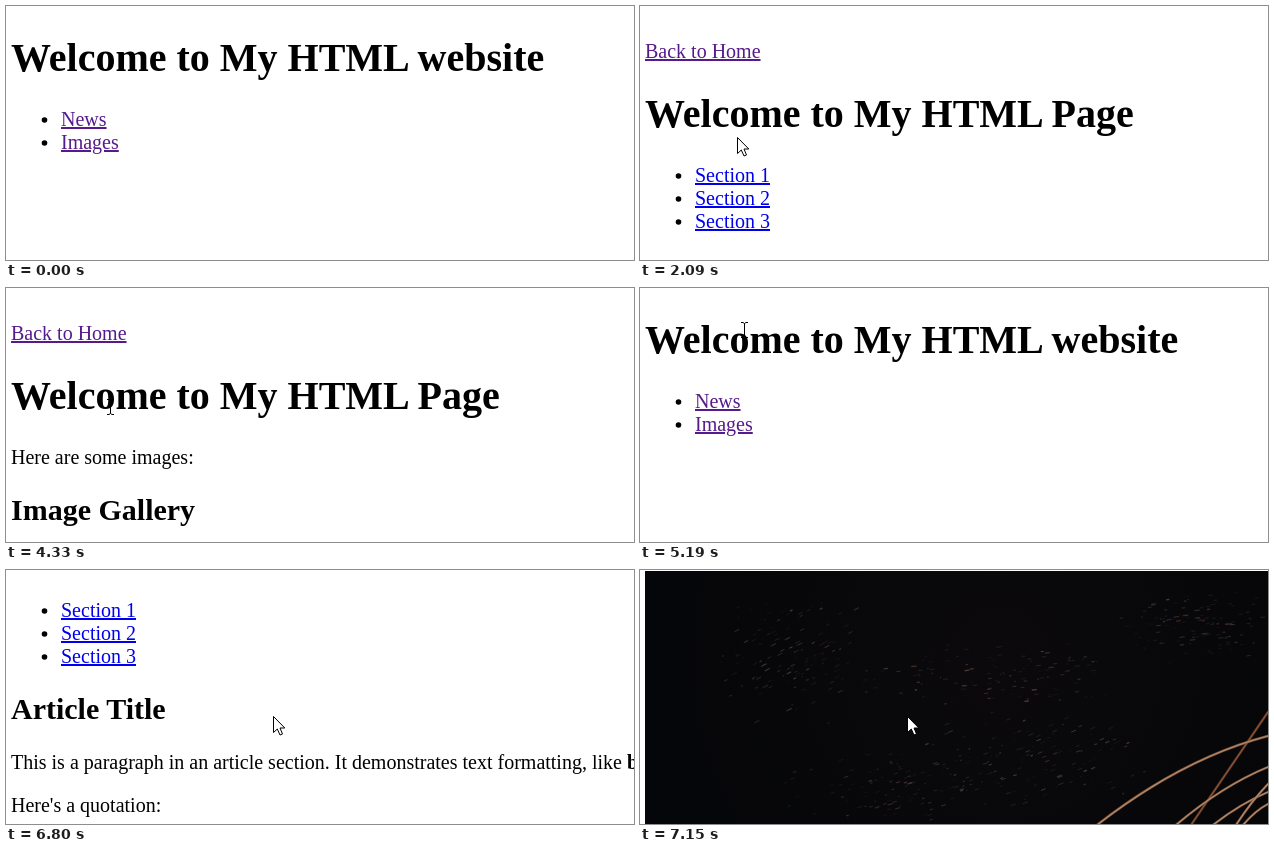
An HTML page for the animation above (8 s loop, 628 by 254 pixels).

```html
<!DOCTYPE html>
<html lang="en">
<head>
<meta charset="utf-8">
<title>My HTML website</title>
<style>
  html, body { margin: 0; width: 100%; height: 100%; overflow: hidden; background: #fff; }
  svg { display: block; }
  text { font: 20px "Liberation Serif", "Times New Roman", serif; }
  .h1 { font-size: 40px; font-weight: bold; }
  .h2 { font-size: 30px; font-weight: bold; }
  .link { fill: #00e; text-decoration: underline; }
  .seen { fill: #551a8b; }
</style>
</head>
<body>
<svg width="628" height="254" viewBox="0 0 628 254">
  <defs>
    <linearGradient id="sky" gradientUnits="userSpaceOnUse" x1="200" y1="-20" x2="420" y2="270">
      <stop offset="0" stop-color="#010a38"/>
      <stop offset=".55" stop-color="#01124a"/>
      <stop offset="1" stop-color="#012260"/>
    </linearGradient>
    <radialGradient id="night" gradientUnits="userSpaceOnUse" cx="360" cy="90" r="360">
      <stop offset="0" stop-color="#0b090b"/>
      <stop offset="1" stop-color="#050609"/>
    </radialGradient>
  </defs>

  <g id="home">
    <text class="h1" x="5" y="65">Welcome to My HTML website</text>
  </g>

  <g id="news">
    <text class="link seen" x="5" y="52">Back to Home</text>
    <text class="h1" x="5" y="121">Welcome to My HTML Page</text>
    <text class="h2" x="5" y="278">Article Title</text>
    <text x="5" y="328">This is a paragraph in an article section. It demonstrates text formatting, like <tspan font-weight="bold">bold</tspan></text>
    <text x="5" y="371">Here's a quotation:</text>
    <g id="stars"><rect x="5" y="-529" width="623" height="930" fill="url(#sky)"/></g>
    <g id="field"><rect x="5" y="-229" width="623" height="500" fill="url(#night)"/></g>
  </g>

  <g id="images">
    <text class="link seen" x="5" y="52">Back to Home</text>
    <text class="h1" x="5" y="121">Welcome to My HTML Page</text>
    <text x="5" y="176">Here are some images:</text>
    <text class="h2" x="5" y="232">Image Gallery</text>
  </g>

  <rect width="628" height="1" fill="#fff"/>

  <g id="cursor" fill="#fff" stroke="#000" stroke-linejoin="round">
    <path id="arrow" d="M.5 .5V16.5L4.3 13L7 19L9.5 18L7 12H11.8Z"/>
    <path id="hand" d="M-1.5 12V1.5a1.5 1.5 0 0 1 3 0V7.5a1.5 1.5 0 0 1 3 .5a1.5 1.5 0 0 1 3 .7a1.5 1.5 0 0 1 2.8 1V15L8.5 18V21.5H-.5V19L-5 12.5a1.6 1.6 0 0 1 2.4-2ZM1.5 7.5V11M4.5 8V11.5M7.5 8.7V12"/>
    <path id="beam" fill="none" d="M-3 -7.5H-1L.5 -6.5L2 -7.5H4M.5 -6.5V6.5M-3 7.5H-1L.5 6.5L2 7.5H4"/>
  </g>
</svg>
<script>
const LOOP = 8000, STEP = 68;
const $ = id => document.getElementById(id);

const PAGES = [[0, 'home'], [1490, 'news'], [2910, 'home'], [3790, 'images'], [5060, 'home'], [6270, 'news']];

// pointer moves: start, end, x, y reached
const ENTER = 260, FROM = [510, 226];
const MOVES = [
  [260, 1010, 126, 116], [1080, 1280, 88, 113], [2020, 2090, 97, 131], [2090, 2430, 115, 170],
  [2430, 2840, 95, 49], [2910, 3040, 98, 42], [3170, 3440, 120, 130], [3440, 3640, 104, 138],
  [4060, 4800, 104, 37], [5060, 5190, 104, 42], [5320, 5800, 107, 135], [5800, 6140, 92, 116],
  [6470, 6600, 267, 146]
];

// wheel scrolling in equal ticks
const scrollAfter = n => 129 + 320 * n;
const scrollAt = t => t < 6800 ? 0 : scrollAfter(Math.min(5, Math.floor((t - 6800) / 70)));

function seeded(s) {
  return () => (s = (s * 16807) % 2147483647) / 2147483647;
}

function add(parent, tag, attrs, text = '') {
  const el = document.createElementNS('http://www.w3.org/2000/svg', tag);
  for (const k in attrs) el.setAttribute(k, attrs[k]);
  el.textContent = text;
  parent.append(el);
}

function stroke(parent, d, color, width, opacity = 1) {
  add(parent, 'path', { d, stroke: color, 'stroke-width': width, opacity, fill: 'none', 'stroke-linecap': 'round' });
}

function addList(id, items, y, style) {
  items.forEach((item, i) => {
    add($(id), 'circle', { cx: 38.5, cy: y + 23 * i - 6, r: 2.8 });
    add($(id), 'text', { class: style, x: 55, y: y + 23 * i }, item);
  });
}

function drawStars() {
  const g = $('stars'), rnd = seeded(41);
  g.setAttribute('transform', `translate(0 ${scrollAfter(3)})`);
  const star = (x, y, n, color, opacity) =>
    stroke(g, `M${x - n} ${y - n * .75}l${2 * n} ${n * 1.5}`, color, .7 + n * .45, opacity);
  const bright = [[511, 117], [87, 152], [257, 26], [482, 183], [206, 152], [314, 163], [587, 117], [203, 202]];
  for (const [x, y] of bright) star(x, y, 2.1, '#a9b4da', .7);
  for (let i = 0; i < 420; i++) {
    const x = 10 + rnd() * 614, y = -520 + rnd() * 912, lit = rnd() < .32;
    star(x, y, lit ? 1.6 : 1.1, lit ? '#a0acd4' : '#5a78b8', lit ? .25 + rnd() * .35 : .1 + rnd() * .2);
  }
}

function drawField() {
  const g = $('field'), rnd = seeded(77);
  g.setAttribute('transform', `translate(0 ${scrollAfter(5)})`);
  // faint flecks scattered around a few centres: x, y, spread x, spread y, rise
  const clumps = [[150, 90, 75, 65, .5], [350, 105, 150, 32, .1], [560, 55, 90, 40, .1], [400, 185, 130, 50, .4], [260, 215, 130, 40, .3]];
  const colors = ['#5b4a42', '#40363a', '#4a4c52', '#6b4535'];
  const spread = () => rnd() + rnd() - 1;
  for (const [x, y, w, h, rise] of clumps) {
    for (let i = 0; i < 130; i++) {
      const len = .5 + rnd() * 4;
      stroke(g, `M${x + spread() * w} ${y + spread() * h}l${len} ${-rise * len}`,
        colors[Math.floor(rnd() * 4)], .6 + rnd() * .9, .15 + rnd() ** 2 * .65);
    }
  }
  // grass: foot x, height at the right edge, bend
  const blades = [[551, 142, 0], [457, 166, 22], [536, 197, 10], [573, 222, 5], [596, 214, 4], [603, 234, 4]];
  blades.forEach(([x, y, bend], i) => {
    const d = `M${x} 255Q${(x + 628) / 2} ${(255 + y) / 2 - bend} 628 ${y}`;
    stroke(g, d, i ? '#805a42' : '#5c3420', 2.4);
    stroke(g, d, i ? '#b98c69' : '#8d5636', 1.1);
  });
}

function pointer(t) {
  let [x, y] = FROM;
  for (const [t0, t1, x1, y1] of MOVES) {
    if (t < t0) break;
    const p = t >= t1 ? 1 : Math.floor((t - t0) / STEP) * STEP / (t1 - t0);
    const e = p * p * (3 - 2 * p);
    x += (x1 - x) * e;
    y += (y1 - y) * e;
  }
  return [Math.round(x), Math.round(y)];
}

function shapeAt(page, x, y) {
  for (const el of page.querySelectorAll('text')) {
    const b = el.getBBox();
    if (x >= b.x && x <= b.x + b.width && y >= b.y && y <= b.y + b.height) {
      return el.classList.contains('link') ? 'hand' : 'beam';
    }
  }
  return 'arrow';
}

function show(ids, active) {
  for (const id of ids) $(id).style.display = id === active ? '' : 'none';
}

function draw(t) {
  const page = PAGES.filter(p => p[0] <= t).pop()[1];
  const scroll = scrollAt(t), [x, y] = pointer(t);
  show(['home', 'news', 'images'], page);
  $('news').setAttribute('transform', `translate(0 ${-scroll})`);
  $('cursor').style.display = t < ENTER ? 'none' : '';
  $('cursor').setAttribute('transform', `translate(${x} ${y})`);
  show(['arrow', 'hand', 'beam'], shapeAt($(page), x, y + scroll));
}

addList('home', ['News', 'Images'], 120, 'link seen');
addList('news', ['Section 1', 'Section 2', 'Section 3'], 176, 'link');
drawStars();
drawField();

const start = performance.now();
function tick() {
  draw((performance.now() - start) % LOOP);
  requestAnimationFrame(tick);
}
draw(0);
requestAnimationFrame(tick);
</script>
</body>
</html>
```
